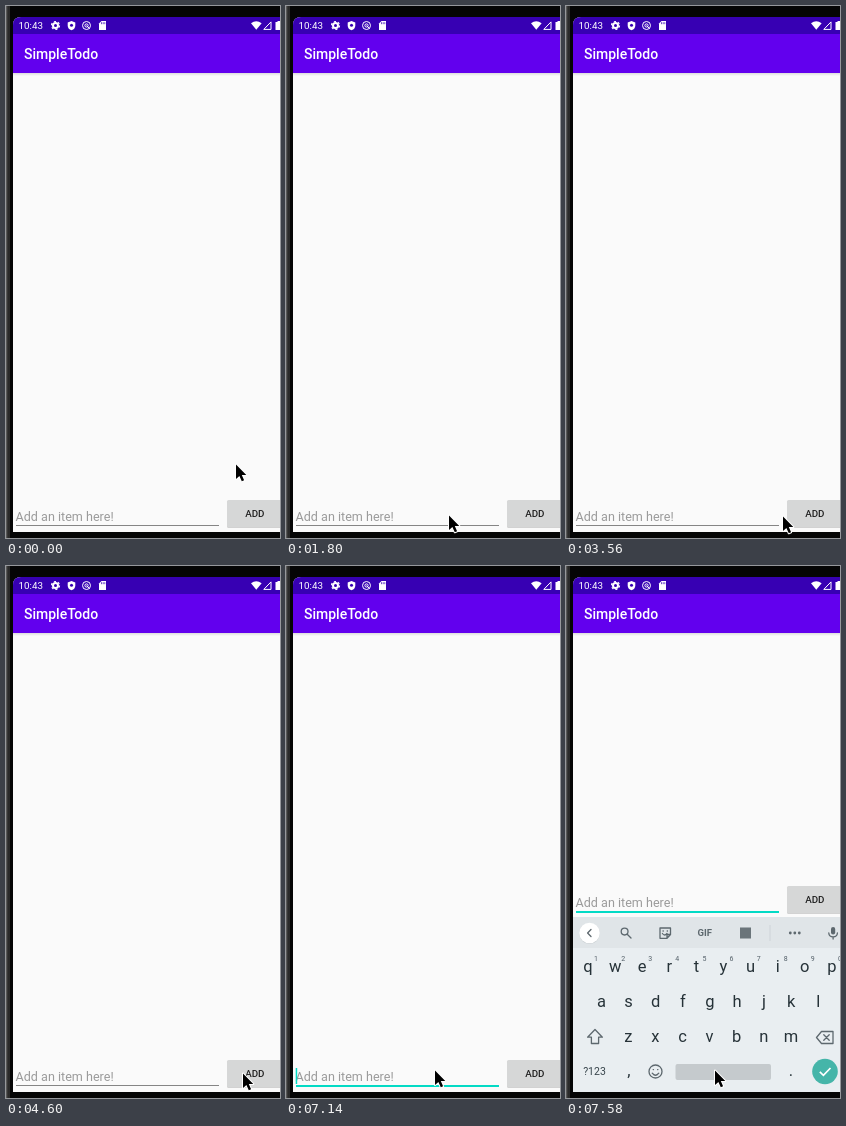
Animation, 274 px wide and 532 px high, one loop 8 s. Source, as an HTML page:

```html
<!DOCTYPE html>
<html lang="en">
<head>
<meta charset="utf-8">
<title>SimpleTodo</title>
<style>
  html, body { margin: 0; width: 100%; height: 100%; overflow: hidden; background: #000; }
  svg { display: block; width: 274px; height: 532px; }
  text { font-family: Roboto, "Noto Sans", sans-serif; }
  .medium { font-weight: 500; }
  .key { font-size: 16.5px; fill: #263238; text-anchor: middle; }
  .digit { font-size: 7px; fill: #546069; text-anchor: middle; }
  .line { fill: none; stroke: #5d686e; stroke-width: 1.3; stroke-linejoin: round; stroke-linecap: round; }
</style>
</head>
<body>
<svg viewBox="0 0 274 532">
  <defs>
    <clipPath id="screen"><path d="M7 526V19Q7 11 15 11H274V526Z"/></clipPath>
    <linearGradient id="shade" x2="0" y2="1">
      <stop offset="0" stop-color="#000" stop-opacity=".12"/>
      <stop offset="1" stop-color="#000" stop-opacity="0"/>
    </linearGradient>
  </defs>

  <rect width="274" height="532" fill="#050505"/>
  <rect width="4" height="532" fill="#2a2a2a"/>
  <rect width="1.3" height="532" fill="#585858"/>

  <g clip-path="url(#screen)">
    <rect x="7" y="11" width="267" height="515" fill="#fafafa"/>
    <rect x="7" y="67" width="267" height="3" fill="url(#shade)"/>
    <rect x="7" y="28" width="267" height="39" fill="#6200ee"/>
    <rect x="7" y="11" width="267" height="17" fill="#3700b3"/>
    <text class="medium" x="18" y="53" font-size="14" fill="#fff">SimpleTodo</text>

    <g fill="#fff">
      <text x="12.5" y="23" font-size="9.8">10:43</text>
      <g fill="none" stroke="#fff">
        <circle cx="49.5" cy="19.5" r="2.5" stroke-width="2"/>
        <circle cx="49.5" cy="19.5" r="4" stroke-width="1.2" stroke-dasharray="2.1 2.09"/>
        <circle cx="80.5" cy="19.5" r="4" stroke-width="1"/>
        <circle cx="80.5" cy="19.5" r="1.6" stroke-width="1"/>
        <path d="M80.5 19.5L83.5 22.5"/>
      </g>
      <path d="M65.5 15L69.3 16.5V19.5Q69.3 23 65.5 24.3Q61.7 23 61.7 19.5V16.5Z"/>
      <circle cx="65.5" cy="19.3" r="1.5" fill="#3700b3"/>
      <path d="M95.5 15H100V24H93V17.5Z"/>
      <path d="M95.5 16.2v2M97.2 16.2v2M98.8 16.2v2" stroke="#3700b3" stroke-width=".7"/>
      <path d="M245 17.3Q250.3 13 255.6 17.3L250.3 23.8Z"/>
      <path d="M257.8 23.4L265 15.9V23.4Z" fill="none" stroke="#fff"/>
      <path d="M269.5 16H271.5V15H274V24H269.5Z"/>
    </g>

    <g id="form">
      <text x="9.5" y="515" font-size="12.6" fill="#9b9b9b">Add an item here!</text>
      <rect id="underline" x="10" y="519" width="203"/>
      <rect id="caret" x="9.7" y="502" width="1.5" height="16" fill="#03dac5"/>
      <rect x="221" y="495" width="60" height="27" rx="1.5" fill="#000" opacity=".16"/>
      <rect x="221" y="494" width="60" height="27" rx="1.5" fill="#d6d7d7"/>
      <text class="medium" x="248.8" y="510.5" font-size="9.8" fill="#212121" text-anchor="middle">ADD</text>
    </g>
  </g>

  <g id="keyboard">
    <rect x="7" y="351" width="267" height="175" fill="#e9eef1"/>
    <rect x="7" y="351" width="267" height="31" fill="#e0e5e8"/>
    <circle cx="23.5" cy="367.6" r="10.3" fill="#c9cfd2"/>
    <circle cx="23.5" cy="367" r="10.3" fill="#fff"/>
    <path class="line" d="M25 363.5L21.6 367L25 370.5"/>
    <circle class="line" cx="58.6" cy="365.6" r="3.4"/>
    <path class="line" d="M61.2 368.2L65 372" stroke-width="1.7"/>
    <path class="line" d="M94 362H104.5V368.5L101 372.3H94ZM104.5 368.5H101V372.3M96.4 367.5Q98.5 370.5 101 367.5M97 365h.3M101.2 365h.3"/>
    <text x="138.8" y="370.3" font-size="9.5" font-weight="700" fill="#5d686e" text-anchor="middle">GIF</text>
    <rect x="174" y="361.5" width="11" height="11" fill="#6b757a"/>
    <rect x="203.5" y="359" width="1" height="16" fill="#ced4d7"/>
    <g fill="#5d686e">
      <circle cx="224.3" cy="367" r="1.4"/><circle cx="228.8" cy="367" r="1.4"/><circle cx="233.3" cy="367" r="1.4"/>
      <rect x="265" y="361" width="4.2" height="7.5" rx="2.1"/>
    </g>
    <path class="line" d="M262.8 367Q263 370.8 267.1 370.8T271.4 367M267.1 371V373"/>
    <g id="keys"></g>
    <path class="line" d="M29 463.5L36.4 471.2H32.6V477.5H25.4V471.2H21.6Z"/>
    <path class="line" d="M255.5 465.5H267V477.5H255.5L250.5 471.5ZM257.8 468.8L263.2 474.2M263.2 468.8L257.8 474.2"/>
    <text x="28.5" y="509.3" font-size="10.5" fill="#37444b" text-anchor="middle">?123</text>
    <text class="key" x="62.8" y="510" font-size="14">,</text>
    <text class="key" x="225" y="510" font-size="14">.</text>
    <circle class="line" cx="89.5" cy="505.5" r="6.5"/>
    <path class="line" d="M86.2 507.2Q89.5 511.3 92.8 507.2M87.2 503.6h.3M91.6 503.6h.3"/>
    <rect x="109.5" y="498" width="95.5" height="16" rx="2" fill="#c5cacd"/>
    <circle cx="259" cy="505.5" r="12.8" fill="#45b5a9"/>
    <path d="M253.8 505.8L257.4 509.3L264.5 502" fill="none" stroke="#fff" stroke-width="1.7"/>
  </g>

  <g id="pointer" stroke-width="2" stroke-linejoin="round">
    <path id="arrow" d="M0 .5V15L3.4 11.9L5.8 17.3L8.1 16.3L5.8 11H10.3Z" stroke="#fff" paint-order="stroke"/>
  </g>
</svg>

<script>
const LOOP = 8000;
const $ = id => document.getElementById(id);

// [time, x, y]; no position means the pointer is hidden
const pointerSteps = [
  [0, 230, 458], [1200, 229, 471], [1350, 215, 502], [1500, 193, 515], [1650, 172, 513], [1800, 163, 509],
  [2530, 149, 508], [2680, 117, 507], [2820, 100, 506], [2970, 109, 506], [3120, 138, 507],
  [3270, 170, 508], [3410, 200, 510], [3560, 217, 510],
  [3710, 228, 509], [3850, 235, 507], [4150, 237, 506], [4600, 237, 507], [4750],
  [6250, 226, 520], [6400, 230, 513], [6550, 196, 506], [6690, 158, 503], [6840, 149, 504]
];

// [time, offset, opacity]
const keyboardSteps = [[0, 190, 0], [7280, 15, .78], [7430, 2, .97], [7580, 0, 1]];

const at = (steps, t) => steps.findLast(s => s[0] <= t);

function addText(cls, x, y, label) {
  const el = document.createElementNS("http://www.w3.org/2000/svg", "text");
  el.setAttribute("class", cls);
  el.setAttribute("x", x);
  el.setAttribute("y", y);
  el.textContent = label;
  $("keys").append(el);
}

[["qwertyuiop", 22, 405.5], ["asdfghjkl", 35.5, 440.5], ["zxcvbnm", 62.3, 476]].forEach(([row, x, y], r) => {
  [...row].forEach((key, i) => {
    addText("key", x + i * 27.1, y, key);
    if (r === 0) addText("digit", x + 8 + i * 27.1, 394.5, (i + 1) % 10);
  });
});

function draw(t) {
  const [, x, y] = at(pointerSteps, t);
  $("pointer").setAttribute("visibility", x === undefined ? "hidden" : "visible");
  if (x !== undefined) $("pointer").setAttribute("transform", `translate(${x} ${y})`);

  const focused = t >= 6840;
  $("underline").setAttribute("height", focused ? 2 : 1);
  $("underline").setAttribute("fill", focused ? "#03dac5" : "#858585");
  $("caret").setAttribute("visibility", t >= 7140 && t < 7580 ? "visible" : "hidden");

  $("form").setAttribute("transform", `translate(0 ${t >= 7280 ? -174 : 0})`);
  const [, offset, opacity] = at(keyboardSteps, t);
  $("keyboard").setAttribute("transform", `translate(0 ${offset})`);
  $("keyboard").setAttribute("opacity", opacity);
}

const start = performance.now();
function tick() {
  draw((performance.now() - start) % LOOP);
  requestAnimationFrame(tick);
}
tick();
</script>
</body>
</html>
```
